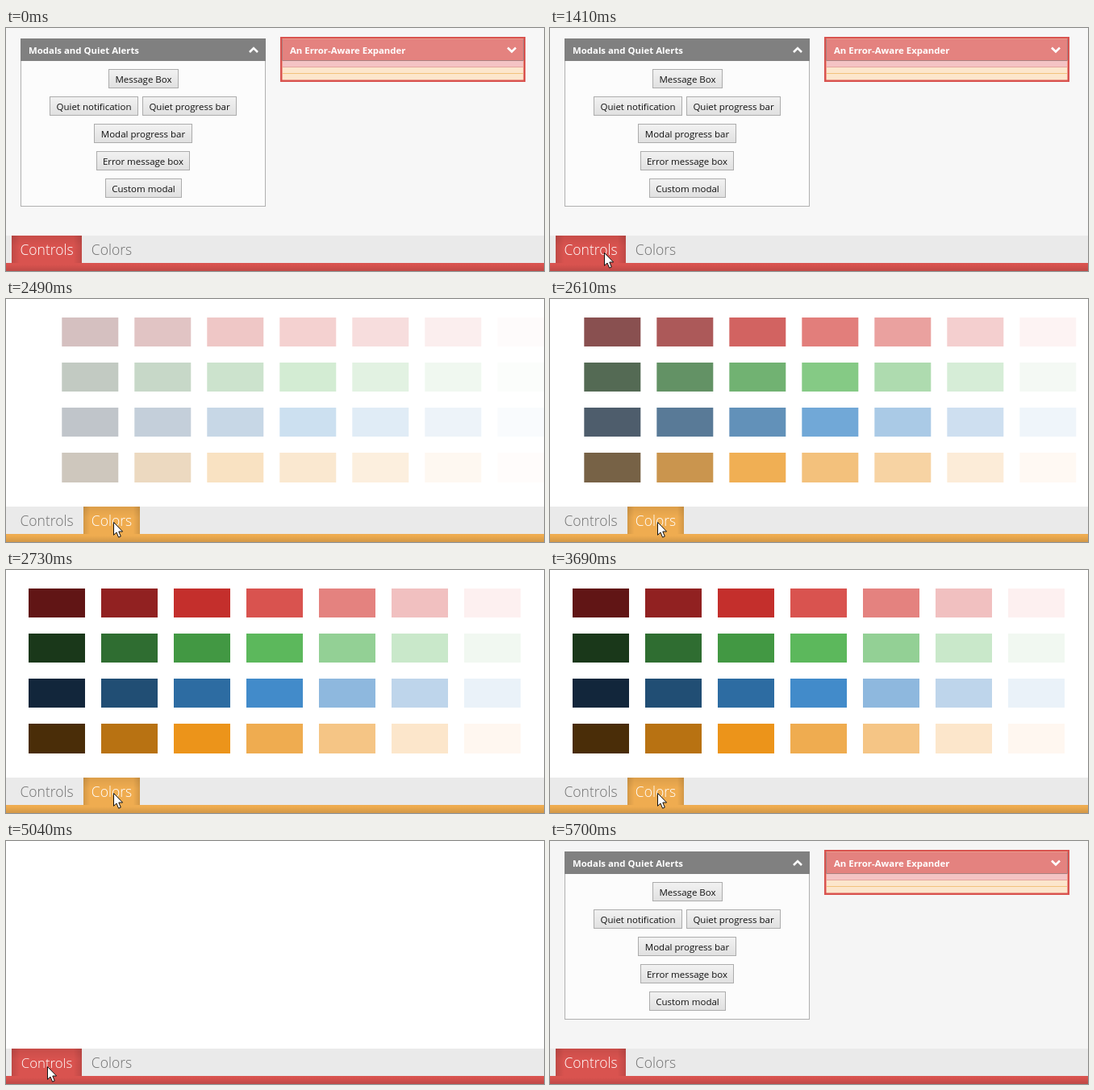
These frames come from a looping animation (667 by 302 pixels, 6420 ms). An HTML page:

```html
<!DOCTYPE html>
<html lang="en">
<head>
<meta charset="utf-8">
<title>Tabbed window</title>
<style>
html, body { margin: 0; width: 100%; height: 100%; overflow: hidden; background: #fff; }
svg { display: block; width: 667px; height: 302px; }
text { font: 11.5px "Open Sans", "Noto Sans", sans-serif; fill: #111; white-space: pre; }
.head { font-size: 11.4px; font-weight: 700; fill: #fff; }
.tab { font-size: 17.5px; font-weight: 300; }
.mid { text-anchor: middle; }
.chevron { fill: none; stroke: #fff; stroke-width: 2.6; }
</style>
</head>
<body>
<svg id="stage" viewBox="0 0 667 302">
  <defs>
    <linearGradient id="button" x2="0" y2="1">
      <stop stop-color="#f2f2f2"/><stop offset="1" stop-color="#e0e0e0"/>
    </linearGradient>
    <linearGradient id="sides">
      <stop stop-opacity=".12"/><stop offset=".12" stop-opacity="0"/>
      <stop offset=".88" stop-opacity="0"/><stop offset="1" stop-opacity=".12"/>
    </linearGradient>
    <linearGradient id="top" x2="0" y2="1">
      <stop stop-opacity=".08"/><stop offset=".4" stop-opacity="0"/>
    </linearGradient>
    <linearGradient id="bottom" x2="0" y2="1">
      <stop offset=".2" stop-opacity="0"/><stop offset="1" stop-opacity=".12"/>
    </linearGradient>
  </defs>
  <rect width="667" height="302" fill="#fff"/>
  <g id="controls">
    <rect id="paper" width="667" height="258"/>
    <g id="panels">
      <rect x="18.5" y="13.5" width="303" height="208" fill="#fcfcfc" stroke="#b0b0b0"/>
      <rect x="18" y="13" width="304" height="28" fill="#808080"/>
      <text class="head" x="28" y="32">Modals and Quiet Alerts</text>
      <path class="chevron" d="M302 30l5-5l5 5"/>
      <rect x="341.25" y="12.25" width="301.5" height="53.5" fill="#fce6cc" stroke="#d9534f" stroke-width="2.5"/>
      <rect x="343" y="14" width="298" height="27" fill="#e4827f"/>
      <path d="M342.5 14V40.5H641.5V14" fill="none" stroke="#a98080"/>
      <rect x="343" y="41" width="298" height="7" fill="#f4c3c4"/>
      <path d="M343 48.5H641" stroke="#e6a6a0"/>
      <path d="M343 56.5H641" stroke="#f2c27c"/>
      <text class="head" x="352" y="32">An Error-Aware Expander</text>
      <path class="chevron" d="M622 24.5l5 5l5-5"/>
    </g>
  </g>
  <g id="colors"></g>
  <rect y="258" width="667" height="34" fill="#eaeaea"/>
  <g id="tabs"></g>
  <rect id="bar" y="292" width="667" height="10"/>
  <rect y="292" width="667" height="10" fill="url(#bottom)"/>
  <path id="cursor" d="M.5 .5V16.3L4 13L6.6 19.2L9.3 18L6.8 12H11.6Z" fill="#fff" stroke="#111" stroke-linejoin="round"/>
</svg>
<script>
const LOOP = 6420;
const TO_COLORS = 2280, TO_CONTROLS = 5040;
const $ = id => document.getElementById(id);

function add(parent, name, attrs, label) {
  const el = document.createElementNS("http://www.w3.org/2000/svg", name);
  for (const key in attrs) el.setAttribute(key, attrs[key]);
  if (label) el.textContent = label;
  parent.appendChild(el);
  return el;
}

const ramp = (t, from, to) => Math.min(1, Math.max(0, (t - from) / (to - from)));
const ease = (t, from, to) => {
  const u = ramp(t, from, to);
  return u * u * (3 - 2 * u);
};

const buttons = [
  ["Message Box", 127, 51, 87],
  ["Quiet notification", 54, 85, 110],
  ["Quiet progress bar", 169, 85, 117],
  ["Modal progress bar", 109, 119, 122],
  ["Error message box", 112, 153, 116],
  ["Custom modal", 123, 187, 95]
];
for (const [label, x, y, w] of buttons) {
  add($("panels"), "rect", { x: x + .5, y: y + .5, width: w - 1, height: 23, fill: "url(#button)", stroke: "#acacac" });
  add($("panels"), "text", { class: "mid", x: x + w / 2, y: y + 17 }, label);
}

const swatches = [
  "611515 912121 c42f2c d9534f e4827f f1c0c0 fdf0f0",
  "1a381a 2f6d31 429843 5cb85c 93d095 c9e8ca f1f8f1",
  "12263b 214e74 2d6ca2 428bca 8eb8de bed5eb eaf2f9",
  "4a2d08 b87212 ec941a efac50 f5c585 fce6cb fff7f0"
];
swatches.forEach((row, j) => row.split(" ").forEach((hex, i) =>
  add($("colors"), "rect", { x: 28 + 90 * i, y: 23 + 56 * j, width: 70, height: j === 3 ? 37 : 36, fill: "#" + hex })));

function makeTab(label, x, w, color) {
  const fill = add($("tabs"), "g", {});
  for (const paint of [color, "url(#sides)", "url(#top)"])
    add(fill, "rect", { x, y: 258, width: w, height: 34, fill: paint });
  const mid = x + w / 2;
  const text = add($("tabs"), "text", { class: "tab mid", y: 6 }, label);
  return (lit, press) => {
    const mix = (a, b) => Math.round(a + (b - a) * lit);
    const grey = mix(112, 255);
    fill.setAttribute("opacity", lit);
    text.style.fill = `rgb(${grey},${grey},${grey})`;
    text.setAttribute("transform", `translate(${mid} 276) scale(${1 - .04 * press})`);
  };
}
const controlsTab = makeTab("Controls", 7, 87, "#d9534f");
const colorsTab = makeTab("Colors", 96, 70, "#efac50");

// Pointer path: time, x, y
const path = [
  [900, 48, 302], [1410, 67, 279], [1530, 77, 279], [2160, 133, 277],
  [3690, 133, 277], [4320, 72, 280], [4560, 51, 280], [5280, 51, 280], [5580, 44, 303]
];
function pointer(t) {
  const i = path.findIndex(p => p[0] > t);
  if (i < 1) return null;
  const [t0, x0, y0] = path[i - 1], [t1, x1, y1] = path[i];
  const u = ramp(t, t0, t1);
  return [x0 + (x1 - x0) * u, y0 + (y1 - y0) * u];
}

function showPage(el, t, start) {
  const p = ease(t, start + 90, start + 450);
  el.setAttribute("opacity", p);
  el.setAttribute("transform", `translate(${56 * (1 - p)} 0)`);
}

const press = (t, down, up) => ramp(t, down, down + 90) * (1 - ramp(t, up, up + 120));

function draw(t) {
  const onColors = t >= TO_COLORS && t < TO_CONTROLS;
  $("controls").style.display = onColors ? "none" : "";
  $("colors").style.display = onColors ? "" : "none";
  if (onColors) showPage($("colors"), t, TO_COLORS);
  else {
    const back = t >= TO_CONTROLS;
    showPage($("panels"), t, back ? TO_CONTROLS : -1000);
    $("paper").setAttribute("fill", back ? "#f5f5f5" : "#f7f7f7");
    $("paper").setAttribute("opacity", back ? ease(t, TO_CONTROLS + 90, TO_CONTROLS + 450) : 1);
  }
  $("bar").setAttribute("fill", onColors ? "#efac50" : "#d9534f");
  controlsTab(onColors ? ramp(t, 4080, 4200) : 1, press(t, 4800, TO_CONTROLS));
  colorsTab(onColors ? 1 : t < TO_COLORS ? ramp(t, 1740, 1860) : 0, press(t, 2070, TO_COLORS));

  const at = pointer(t);
  $("cursor").style.display = at ? "" : "none";
  if (at) $("cursor").setAttribute("transform", `translate(${at.map(Math.round)})`);
}

const begin = performance.now();
function tick() {
  draw((performance.now() - begin) % LOOP);
  requestAnimationFrame(tick);
}
tick();
</script>
</body>
</html>
```
